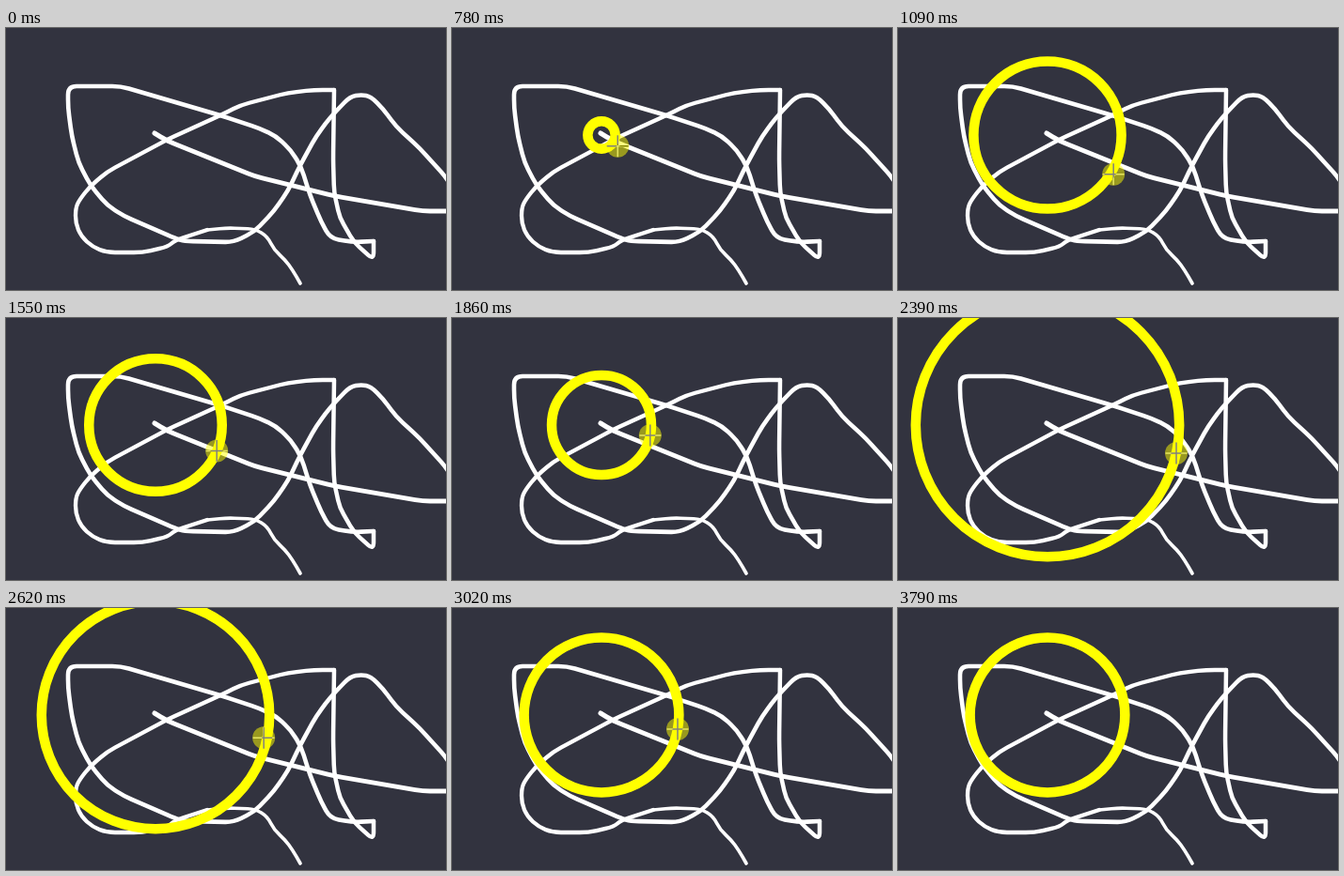
These frames come from a looping animation (468 by 279 pixels, 4570 ms). An HTML page with a canvas:

```html
<!DOCTYPE html>
<html lang="en">
<head>
<meta charset="utf-8">
<title>Drawing a circle</title>
<style>
html, body { margin: 0; width: 100%; height: 100%; overflow: hidden; background: #32333f; }
canvas { display: block; }
</style>
</head>
<body>
<canvas id="stage" width="468" height="279"></canvas>
<script>
const ctx = document.getElementById('stage').getContext('2d');
const LOOP = 4570;
const CENTER = { x: 159, y: 114 };
const RING_WIDTH = 10.5;

// Scribble strokes: line width, corner rounding, points
const strokes = [
  [5, 8, '158,112 171,120 265,158 350,179 443,195 480,195'],
  [4.6, 9, '476,173 468,159 440,128 415,105 401,86 388,73 378,71 366,73 345,95 330,115 313,146 300,173 285,195 264,217 242,228 190,227 180,224 125,200 108,189 90,168 77,143 70,115 66,85 66,62 122,62 228,93 270,107 287,115 303,130 314,148 323,177 335,206 345,224 369,228 391,227'],
  [4.5, 8, '391,227 391,247 370,228 355,202 349,175 348,140 349,66'],
  [4.3, 9, '349,66 328,66 300,69 250,82 228,93 171,119 108,153 90,168 78,183 74,192 74,208 80,222 92,233 107,239 145,239 172,233 180,226 214,215'],
  [3.7, 8, '214,215 235,213 265,214 278,222 285,236 297,247 305,258 313,272']
];

// Cursor moves, each made in n steps; lag makes the ring trail the cursor
const START = { x: 188, y: 213 };
const easeOut = p => u => 1 - Math.pow(1 - u, p);
const moves = [
  { t0: 150, t1: 550, n: 6, to: { x: 158, y: 114 }, via: { x: 71, y: 118 }, ease: easeOut(1.3), lag: 0 },
  { t0: 780, t1: 1240, n: 7, to: { x: 240, y: 161 }, via: { x: 200, y: 142 }, ease: easeOut(1.6), lag: 0.043 },
  { t0: 1470, t1: 2010, n: 8, to: { x: 210, y: 124 }, ease: easeOut(2.6), lag: 0 },
  { t0: 2160, t1: 2390, n: 4, to: { x: 296, y: 144 }, via: { x: 253, y: 128.5 }, ease: easeOut(2.33), lag: 0.043 },
  { t0: 2550, t1: 2780, n: 4, to: { x: 242, y: 130 }, ease: easeOut(1.8), lag: 0.043 },
  { t0: 3020, t1: 3020, n: 1, to: { x: 240, y: 129 }, ease: easeOut(1), lag: 0 },
  { t0: 3400, t1: 3710, n: 5, to: { x: 423, y: 276 }, ease: u => Math.pow(u, 1.5), lag: 0 }
];
const exit = moves[moves.length - 1];
moves.forEach((m, i) => {
  m.from = i ? moves[i - 1].to : START;
  m.via = m.via || { x: (m.from.x + m.to.x) / 2, y: (m.from.y + m.to.y) / 2 };
});

function along(m, u) {
  const s = m.ease(Math.max(0, u)), q = 1 - s;
  const mix = k => q * q * m.from[k] + 2 * q * s * m.via[k] + s * s * m.to[k];
  return { x: mix('x'), y: mix('y') };
}

const reach = p => Math.hypot(p.x - CENTER.x, p.y - CENTER.y);

function pose(t) {
  let move = null;
  for (const m of moves) if (t >= m.t0) move = m;
  if (!move) return { cursor: START, radius: 0 };
  const gap = (move.t1 - move.t0) / (move.n - 1) || 1;
  const u = Math.min(move.n, Math.floor((t - move.t0) / gap + 1e-6) + 1) / move.n;
  const radius = t < 780 ? 0 : move === exit ? reach(exit.from) : reach(along(move, u - move.lag));
  return { cursor: along(move, u), radius };
}

function roundedPath(text, cut) {
  const pts = text.split(' ').map(p => p.split(',').map(Number));
  const path = new Path2D();
  const toward = (a, b) => {
    const len = Math.hypot(b[0] - a[0], b[1] - a[1]);
    const k = Math.min(cut, len / 2) / len;
    return [a[0] + (b[0] - a[0]) * k, a[1] + (b[1] - a[1]) * k];
  };
  path.moveTo(...pts[0]);
  for (let i = 1; i < pts.length - 1; i++) {
    path.lineTo(...toward(pts[i], pts[i - 1]));
    path.quadraticCurveTo(...pts[i], ...toward(pts[i], pts[i + 1]));
  }
  path.lineTo(...pts[pts.length - 1]);
  return path;
}

const scribble = strokes.map(([width, cut, text]) => ({ width, path: roundedPath(text, cut) }));

function drawScribble() {
  ctx.strokeStyle = '#fff';
  ctx.lineCap = ctx.lineJoin = 'round';
  for (const s of scribble) {
    ctx.lineWidth = s.width;
    ctx.stroke(s.path);
  }
}

function drawRing(r) {
  ctx.strokeStyle = '#ff0';
  ctx.lineWidth = RING_WIDTH;
  ctx.beginPath();
  ctx.arc(CENTER.x, CENTER.y, r, 0, Math.PI * 2);
  ctx.stroke();
}

function drawCursor({ x, y }, pressed) {
  // The crosshair inverts whatever is below it
  ctx.globalCompositeOperation = 'difference';
  ctx.fillStyle = '#fff';
  ctx.beginPath();
  ctx.rect(x - 11.5, y - 0.75, 23, 1.5);
  ctx.rect(x - 0.75, y - 11.5, 1.5, 23);
  ctx.fill();
  ctx.globalCompositeOperation = 'source-over';
  if (!pressed) return;
  ctx.fillStyle = 'rgba(255, 255, 0, 0.5)';
  ctx.beginPath();
  ctx.arc(x, y, 12, 0, Math.PI * 2);
  ctx.fill();
}

function draw(t) {
  const { cursor, radius } = pose(t);
  ctx.fillStyle = '#32333f';
  ctx.fillRect(0, 0, 468, 279);
  drawScribble();
  if (radius > 0) drawRing(radius);
  if (t >= 70 && t < 3790) drawCursor(cursor, t >= 630 && t < 3250);
}

const begin = performance.now();
function tick() {
  draw((performance.now() - begin) % LOOP);
  requestAnimationFrame(tick);
}
tick();
</script>
</body>
</html>
```
